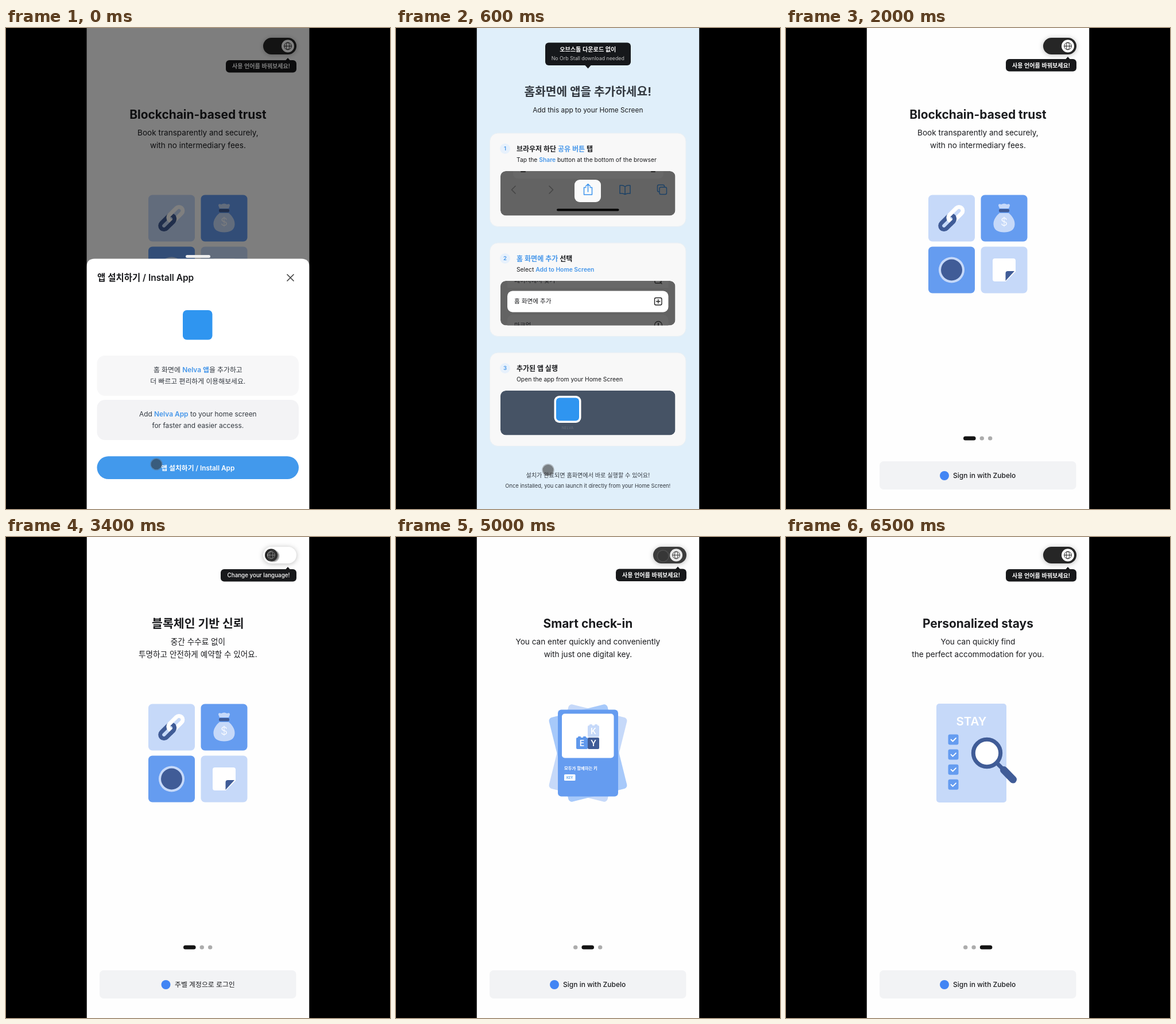
An HTML page for the animation above (6.6 s loop, 669 by 837 pixels).

```html
<!DOCTYPE html>
<html lang="ko">
<head>
<meta charset="utf-8">
<title>App install and onboarding</title>
<style>
html, body { margin: 0; width: 100%; height: 100%; overflow: hidden; background: #000; }
svg { display: block; width: 669px; height: 837px; }
text { font-family: Inter, "Noto Sans CJK KR", "Noto Sans CJK", "Noto Sans CJK JP", sans-serif; text-anchor: middle; fill: #1a1b1e; }
.left { text-anchor: start; }
.thin { font-weight: 300; }
.mid { font-weight: 500; }
.semi { font-weight: 600; }
.bold { font-weight: 700; }
.soft { fill: #333940; }
.blue { fill: #4697ea; font-weight: 600; }
.white { fill: #fff; }
.line { fill: none; stroke-linecap: round; stroke-linejoin: round; }
.glow { filter: drop-shadow(0 1px 4px #0004); }
</style>
</head>
<body>
<svg id="stage" viewBox="0 0 669 837"></svg>
<script>
const LOOP = 6600, STEP = 100;
const PALE = '#c6d9f9', SKY = '#659cf0', NAVY = '#405c97', LOGO = '#2f95f0';
const stage = document.getElementById('stage');

const ramp = (t, a, b) => Math.min(1, Math.max(0, (t - a) / (b - a)));
const ease = p => p * p * (3 - 2 * p);
const mix = (a, b, p) => a + (b - a) * p;
const gray = (a, b, p) => { const v = mix(a, b, p); return `rgb(${v},${v},${v})`; };
const wave = (t, peak, period) => Math.cos(2 * Math.PI * (t - peak) / period);

const box = (x, y, w, h, r, fill, more = '') =>
  `<rect x="${x}" y="${y}" width="${w}" height="${h}" rx="${r}" fill="${fill}" ${more}/>`;
const disc = (x, y, r, fill, more = '') => `<circle cx="${x}" cy="${y}" r="${r}" fill="${fill}" ${more}/>`;
const shape = (d, fill) => `<path d="${d}" fill="${fill}"/>`;
const line = (d, color, width) => `<path class="line" d="${d}" stroke="${color}" stroke-width="${width}"/>`;
const text = (x, y, size, str, cls = '') => `<text x="${x}" y="${y}" font-size="${size}" class="${cls}">${str}</text>`;
const blue = str => `<tspan class="blue">${str}</tspan>`;
const group = (attrs, body) => `<g ${attrs}>${body}</g>`;

const slides = [
  {
    en: ['Blockchain-based trust', 'Book transparently and securely,', 'with no intermediary fees.'],
    ko: ['블록체인 기반 신뢰', '중간 수수료 없이', '투명하고 안전하게 예약할 수 있어요.'],
    art: trustArt()
  },
  {
    en: ['Smart check-in', 'You can enter quickly and conveniently', 'with just one digital key.'],
    ko: ['스마트 체크인', '디지털 키 하나로', '빠르고 간편하게 입장할 수 있어요.'],
    art: keyArt()
  },
  {
    en: ['Personalized stays', 'You can quickly find', 'the perfect accommodation for you.'],
    ko: ['맞춤형 숙소', '나에게 꼭 맞는 숙소를', '빠르게 찾을 수 있어요.'],
    art: stayArt()
  }
];

function trustArt() {
  const link = (x, color) => box(x, -6.5, 30, 13, 6.5, 'none', `stroke="${color}" stroke-width="7"`);
  const chain = link(-25, NAVY) + link(-5, '#fff') +
    `<path d="M-9 6.500H-1.500A6.500 6.500 0 0 0 5 0" fill="none" stroke="${NAVY}" stroke-width="7"/>`;
  return box(248, 290.5, 81, 81, 7, PALE) + box(339.5, 290.5, 81, 81, 7, SKY) +
    box(248, 380.5, 81, 81, 7, SKY) + box(339.5, 380.5, 81, 81, 7, PALE) +
    group('transform="translate(288.3 331) rotate(-45)"', chain) +
    shape('M372 322H388C394 327 399 334 398.500 342C398 352 390 355.500 380 355.500S362 352 361.500 342C361 334 366 327 372 322Z', PALE) +
    shape('M372 314L370 309Q370 305 375 307Q380 304 385 307Q390 305 390 309L388 314Z', PALE) +
    box(371, 315, 18, 5.5, 2, NAVY) + text(380, 344, 19, '$', 'white thin') +
    disc(288.5, 421, 22.5, PALE) + disc(288.5, 421, 18.5, NAVY) +
    shape('M364 401H396Q400 401 400 405V424L383 441H364Q360 441 360 437V405Q360 401 364 401Z', '#fff') +
    shape('M382.500 440V427Q382.500 423 386.500 423H398Z', NAVY);
}

function keyArt() {
  const card = (angle, fill) => box(282, 300.5, 105, 151, 6, fill, `transform="rotate(${angle} 334.5 376)"`);
  const brick = (x, y, fill, letter) =>
    box(x + 3, y - 2, 5, 5, 1, fill) + box(x + 12, y - 2, 5, 5, 1, fill) +
    box(x, y, 20, 20, 2, fill) + text(x + 10, y + 15, 14, letter, 'white semi');
  return card(14, PALE) + card(-14, '#a7c9fa') + card(0, SKY) +
    box(289, 307.5, 90.5, 77, 5, '#fff') +
    brick(334, 328, PALE, 'K') + brick(314, 349, '#5f98ec', 'E') +
    box(334, 349, 20, 20, 2, NAVY) + text(344, 364, 14, 'Y', 'white semi') +
    text(293, 405, 7.4, '모두가 함께하는 키', 'left white bold') +
    box(293, 413, 19.5, 11, 1.5, '#fff') + text(302.7, 420.6, 5.6, 'KEY', 'blue');
}

function stayArt() {
  const checks = [0, 1, 2, 3].map(i => {
    const y = 343.5 + 26.1 * i;
    return box(282.5, y, 18, 18, 3, SKY) + line(`M287.500 ${y + 9}l3 3l5.500-5.500`, '#fff', 1.9);
  }).join('');
  return box(262, 290, 122, 172, 5, PALE) + text(323, 328.3, 20.5, 'STAY', 'white semi') + checks +
    line('M368 394L380 406', NAVY, 7) + line('M379.500 405.500L395.500 422', NAVY, 13) +
    disc(350, 376, 23.7, '#fff', `stroke="${NAVY}" stroke-width="7"`);
}

function toggle(t, k, ko) {
  const x = 491 - 29 * k, ink = gray(38, 235, k);
  const globe = disc(x, 31.5, 6.3, 'none', `stroke="${ink}"`) +
    `<ellipse cx="${x}" cy="31.5" rx="2.8" ry="6.3" fill="none" stroke="${ink}"/>` +
    line(`M${x - 6.3} 31.500h12.600`, ink, 1);
  const top = 55 + wave(t, 300, 310), left = ko ? 374 : 383;
  const tip = box(left, top, 506 - left, 21.5, 6, '#18191b') +
    shape(`M487 ${top + 0.5}L491 ${top - 4}L495 ${top + 0.5}Z`, '#18191b') +
    (ko ? text(440, top + 14.3, 9.8, 'Change your language!', 'mid white')
        : text(444.5, top + 14.5, 10.1, '사용 언어를 바꿔보세요!', 'semi white'));
  return group('class="glow"', box(448, 17, 58, 29, 14.5, gray(38, 255, k))) +
    disc(x, 31.5, 11, gray(255, 38, k)) + globe + tip;
}

function pager(s) {
  let x = 309;
  return slides.map((_, i) => {
    const p = Math.max(0, 1 - Math.abs(s - i)), w = mix(7.4, 21.6, p);
    const dot = box(x, 710.4, w, 7.2, 3.6, gray(172, 20, p));
    x += w + 7;
    return dot;
  }).join('');
}

function login(t) {
  const k = ramp(t, 3200, 3400) - ramp(t, 4900, 5011);
  const ko = t > 3200 && t <= 4900;
  const s = ease(ramp(t, 4000, 4400)) + ease(ramp(t, 5900, 6300));
  const pages = slides.map((slide, i) => {
    const d = i - s, alpha = 1 - 2 * Math.abs(d);
    if (alpha <= 0) return '';
    const [title, a, b] = ko ? slide.ko : slide.en;
    return group(`opacity="${alpha}" transform="translate(${40 * d} 0)"`,
      text(334.4, 158, ko ? 20.5 : 20.9, title, 'bold') +
      text(334.4, 187, 13.58, a) + text(334.4, 208.6, 13.58, b) + slide.art);
  }).join('');
  return box(140.5, 0, 388, 837, 0, '#fefefe') + pages + toggle(t, k, ko) + pager(s) +
    box(163, 754, 342.5, 49, 7, '#f2f3f5') + disc(ko ? 278.5 : 276, 779, 8, '#4285f4') +
    (ko ? text(294, 783, 11.9, '주벨 계정으로 로그인', 'left mid')
        : text(291, 783, 12, 'Sign in with Zubelo', 'left mid'));
}

function sheet() {
  return box(140.5, 0, 388, 837, 0, '#000', 'opacity=".5"') +
    box(313, 395, 43, 5, 2.5, '#eee') +
    shape('M140.500 837V415.500Q140.500 401.500 154.500 401.500H514.500Q528.500 401.500 528.500 415.500V837Z', '#fff') +
    text(159, 440, 15.5, '앱 설치하기 / Install App', 'left semi') +
    line('M490 429l11 11m0-11l-11 11', '#444', 1.7) +
    box(308, 491, 51.5, 51.5, 7, LOGO) +
    box(158.5, 570, 351.5, 70, 14, '#f7f7f8') + box(158.5, 647, 351.5, 70, 14, '#f3f3f5') +
    text(334.3, 598.6, 11.85, `홈 화면에 ${blue('Nelva 앱')}을 추가하고`, 'soft') +
    text(334.3, 619.3, 11.85, '더 빠르고 편리하게 이용해보세요.', 'soft') +
    text(334.3, 676.2, 11.9, `Add ${blue('Nelva App')} to your home screen`, 'soft') +
    text(334.3, 696, 11.9, 'for faster and easier access.', 'soft') +
    box(158.5, 745.2, 351.5, 39.8, 19.9, '#4299ec') +
    text(334.3, 770, 11.8, '앱 설치하기 / Install App', 'white semi');
}

function card(i, title, note, shade, picture) {
  const y = 183 + 191 * i;
  return box(163.5, y, 341.5, 162.5, 14, '#f8f8f8', 'stroke="#e9eff4"') +
    disc(190, y + 27, 9, '#e7f1fc') + text(190, y + 30.3, 9.5, i + 1, 'blue') +
    text(210, y + 31.6, 12, title, 'left bold') + text(210, y + 50.4, 10.3, note, 'left') +
    group(`clip-path="url(#frame${i})"`, box(182, y + 66, 304.500, 77.5, 9, shade) + picture) +
    `<clipPath id="frame${i}">${box(182, y + 66, 304.5, 77.5, 9, '#000')}</clipPath>`;
}

function guide(t) {
  const top = 27.25 - 1.75 * wave(t, 600, 280), dim = '#1d4266';
  const browserBar = box(204, 240, 262, 22, 8, '#686868') +
    line('M218 250h7M445 250h6', '#222', 2) +
    line('M208 275l-6.500 6.500l6.500 6.500M267 275l6.500 6.500l-6.500 6.500', '#444', 1.5) +
    box(311, 264, 46, 39, 9, '#fafafa') +
    line('M331 277.500h-3.500v12.500h14v-12.500h-3.500M334.500 285v-13.500m-4 4l4-4l4 4', '#3c94ee', 1.5) +
    line('M399 276v13.500M399 276q-4-3-9-2v14q5-1 9 1.500q4-2.500 9-1.500v-14q-5-1-9 2', dim, 1.5) +
    box(455.5, 273, 12, 12, 2.5, 'none', `stroke="${dim}" stroke-width="1.5"`) +
    box(459, 277, 12.5, 12.5, 2.5, '#636363', `stroke="${dim}" stroke-width="1.5"`) +
    box(280, 314.5, 108.5, 4, 2, '#050505');
  const menu = box(194, 430, 280.5, 22, 0, '#686868') + box(194, 499, 280.5, 30, 9, '#686868') +
    text(206, 443, 10.6, '페이지에서 찾기', 'left') +
    box(451, 433, 11, 11, 2, 'none', 'stroke="#222" stroke-width="1.4"') + line('M460 442l3 3', '#222', 1.4) +
    box(194, 457.5, 280.5, 37, 9, '#fff') + text(206, 479, 10.6, '홈 화면에 추가', 'left') +
    box(450.5, 469.5, 12.5, 12.5, 2.5, 'none', 'stroke="#222" stroke-width="1.4"') +
    line('M453.500 475.700h6.500m-3.250-3.250v6.500', '#222', 1.4) +
    text(206, 521, 10.6, '마크업', 'left') +
    disc(457, 517, 6.5, 'none', 'stroke="#222" stroke-width="1.4"') + line('M457 514v5', '#222', 2);
  const homeIcon = box(275.5, 640, 47, 47, 9, '#fff') + box(279, 643.5, 40, 40, 6, LOGO) +
    '<text x="299" y="698" font-size="6.5" style="fill:#66707d">NELVA</text>';
  return box(140.5, 0, 388, 837, 0, '#e0effa') +
    box(260, top, 149, 39.5, 6, '#16181b') +
    shape(`M329 ${top + 39}h11l-5.500 6z`, '#16181b') +
    text(334.3, top + 15.6, 10.15, '오브스톨 다운로드 없이', 'white semi') +
    group('opacity=".72"', text(334.3, top + 30.4, 8.8, 'No Orb Stall download needed', 'white')) +
    text(334.3, 117.5, 20.25, '홈화면에 앱을 추가하세요!', 'bold soft') +
    text(334.3, 147, 11.85, 'Add this app to your Home Screen') +
    card(0, `브라우저 하단 ${blue('공유 버튼')} 탭`,
      `Tap the ${blue('Share')} button at the bottom of the browser`, '#636363', browserBar) +
    card(1, `${blue('홈 화면에 추가')} 선택`, `Select ${blue('Add to Home Screen')}`, '#636363', menu) +
    card(2, '추가된 앱 실행', 'Open the app from your Home Screen', '#465365', homeIcon) +
    text(334.3, 782, 10.15, '설치가 완료되면 홈화면에서 바로 실행할 수 있어요!', 'soft') +
    text(334.3, 800, 9.3, 'Once installed, you can launch it directly from your Home Screen!', 'soft');
}

// time, x, y, opacity
const path = [
  [0, 262, 759, 1], [600, 265, 769, 1], [800, 265, 769, 1], [1000, 265, 769, 0],
  [2200, 380, 640, 0], [2400, 400, 480, 1], [2800, 466, 33, 1],
  [5600, 465, 33, 1], [5900, 465, 33, 0], [LOOP, 465, 33, 0]
];

function pointer(t) {
  const i = path.findIndex(key => key[0] > t), a = path[i - 1], b = path[i];
  const p = ramp(t, a[0], b[0]);
  const [x, y, alpha] = [1, 2, 3].map(n => mix(a[n], b[n], p));
  return group(`opacity="${alpha}"`,
    disc(x, y, 9.3, '#333', 'fill-opacity=".6"') +
    disc(x, y, 10, 'none', 'stroke="#666" stroke-opacity=".4" stroke-width="1.6"'));
}

function draw(t) {
  const alpha = ramp(t, 0, 300) - ramp(t, 1400, 1700);
  stage.innerHTML = box(0, 0, 669, 837, 0, '#000') +
    `<clipPath id="phone">${box(140.5, 0, 388, 837, 0, '#000')}</clipPath>` +
    group('clip-path="url(#phone)"',
      (alpha < 1 ? login(t) + (t < 1400 ? sheet() : '') : '') +
      (alpha > 0 ? group(`opacity="${alpha}"`, guide(t)) : '') + pointer(t));
}

const start = performance.now();
let shown = -1;
function tick() {
  const t = Math.floor((performance.now() - start) % LOOP / STEP) * STEP;
  if (t !== shown) draw(shown = t);
  requestAnimationFrame(tick);
}
tick();
</script>
</body>
</html>
```
